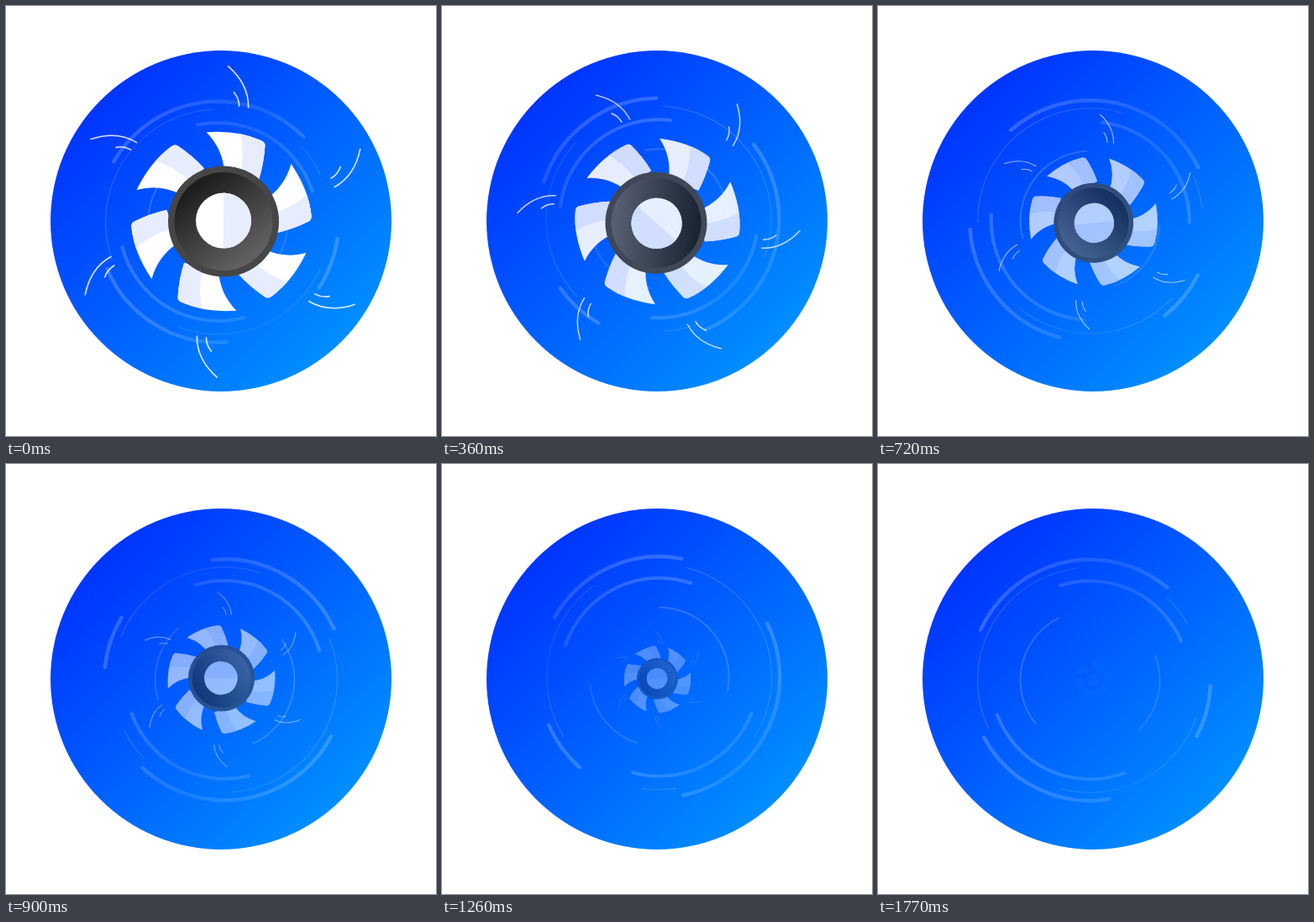
An HTML page with a canvas for the animation above (1800 ms loop, 512 px wide and 512 px high).

```html
<!DOCTYPE html>
<html lang="en">
<head>
<meta charset="utf-8">
<title>Spinning fan</title>
<style>
html, body { margin: 0; width: 100%; height: 100%; overflow: hidden; background: #fff }
canvas { display: block; width: 512px; height: 512px }
</style>
</head>
<body>
<canvas id="stage" width="512" height="512"></canvas>
<script>
const LOOP = 1800, STEPS = 50, TAU = Math.PI * 2;
const rad = deg => deg * Math.PI / 180;
const stage = document.getElementById('stage').getContext('2d');
const layer = document.createElement('canvas');
layer.width = layer.height = 512;
const fan = layer.getContext('2d');

function linear(c, x0, y0, x1, y1, ...colors) {
  const g = c.createLinearGradient(x0, y0, x1, y1);
  colors.forEach((color, i) => g.addColorStop(i / (colors.length - 1), color));
  return g;
}

function disc(c, x, y, r, fill, from = 0, to = TAU) {
  c.fillStyle = fill;
  c.beginPath();
  c.arc(x, y, r, from, to);
  c.fill();
}

const backdrop = linear(stage, 112, 112, 400, 400, '#0034ff', '#008eff');
const sheen = linear(stage, -140, 0, 125, 0,
  ...[.2, .17, .13, .1, .19].map(a => `rgba(255,255,255,${a})`));
const metal = linear(fan, -32, -42, 32, 42, '#1e1e1e', '#606060');

const blade = new Path2D('M-19-106Q18-109 46-97Q51-95 51-91Q50-70 44-50L3-58Q1-86-19-106Z');
const bladeShade = new Path2D('M20-110H60V-50H20Q29-82 20-110Z');
const swish = new Path2D('M10-185Q34-163 33-135.5M16-154Q22-147 22-137.5');

// Arcs of the given lengths in degrees, parted by equal gaps
function ring(r, width, angle, ...lengths) {
  const gap = (360 - lengths.reduce((a, b) => a + b)) / lengths.length;
  stage.lineWidth = width;
  for (const length of lengths) {
    stage.beginPath();
    stage.arc(0, 0, r, rad(angle), rad(angle + length));
    stage.stroke();
    angle += length + gap;
  }
}

function drawRings(ease) {
  stage.save();
  stage.translate(256.5, 257);
  stage.rotate(rad(1076 * ease));
  stage.translate(-4, 0);
  stage.lineCap = 'round';
  stage.strokeStyle = sheen;
  ring(143.5, 4.5, 8, 25, 71, 105);
  ring(134, 1, -42, 17, 86, 108);
  ring(118, 4, 75, 90, 84);
  ring(83, 2, -15, 65, 101);
  stage.restore();
}

// Draws one part six times around the middle, turned and scaled
function sixfold(x, y, turn, scale, draw) {
  fan.setTransform(scale, 0, 0, scale, x, y);
  fan.rotate(rad(turn));
  for (let i = 0; i < 6; i++) {
    fan.save();
    draw();
    fan.restore();
    fan.rotate(TAU / 6);
  }
}

function drawFan(ease) {
  const shade = '#e8ecff';
  fan.resetTransform();
  fan.clearRect(0, 0, 512, 512);

  fan.strokeStyle = 'rgba(255,255,255,.85)';
  fan.lineWidth = 1.6;
  fan.lineCap = 'round';
  sixfold(258, 257, -850 * ease - 1, 1 - .88 * ease, () => fan.stroke(swish));

  sixfold(256.5, 256.5, 1260 * ease + .6, 1 - .8 * ease, () => {
    fan.fillStyle = '#fff';
    fan.fill(blade);
    fan.clip(blade);
    fan.fillStyle = shade;
    fan.fill(bladeShade);
  });

  // The hub sits a little off the axis
  fan.translate(2.5, 0);
  disc(fan, 0, 0, 66, '#464646');
  disc(fan, 0, 0, 58.5, metal);
  disc(fan, 0, -1, 33, '#fff');
  disc(fan, 0, -1, 33, shade, -TAU / 4, TAU / 4);
}

function frame(now) {
  const tick = Math.floor(now % LOOP / 30) * 30;
  const x = Math.floor(tick / (LOOP / STEPS)) / STEPS;
  const ease = x * x * (3 - 2 * x);

  stage.fillStyle = '#fff';
  stage.fillRect(0, 0, 512, 512);
  disc(stage, 256, 256, 203, backdrop);
  drawRings(ease);
  drawFan(ease);
  stage.globalAlpha = 1 - (x ** 1.5 + ease) / 2;
  stage.drawImage(layer, 0, 0);
  stage.globalAlpha = 1;
}

const start = performance.now();
function loop() {
  frame(performance.now() - start);
  requestAnimationFrame(loop);
}
loop();
</script>
</body>
</html>
```
